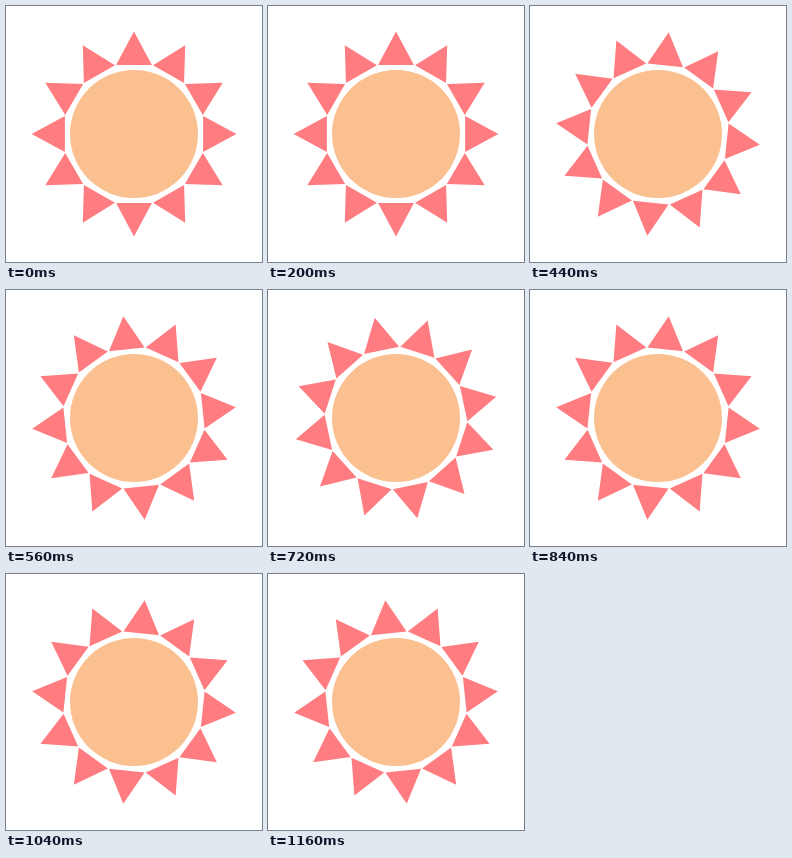
An HTML page for the animation above (1.2 s loop, 256 by 256 pixels).

```html
<!DOCTYPE html>
<html lang="en">
<head>
<meta charset="utf-8">
<title>Turning sun</title>
<style>
  html, body { margin: 0; width: 100%; height: 100%; overflow: hidden; background: #fff; }
  svg { display: block; width: 100%; height: 100%; }
</style>
</head>
<body>
<svg viewBox="-50 -50 100 100">
  <path id="rays" fill="#ff7c81"/>
  <circle r="25" fill="#fac090"/>
</svg>
<script>
  const LOOP = 1200, STEP = 40, TURN = 180;
  const RAYS = 12, TIP = 40, BASE = 27, HALF = 7;
  const rays = document.getElementById('rays');

  // A point at distance r outward and s sideways along a ray
  function point(angle, r, s) {
    const c = Math.cos(angle), n = Math.sin(angle);
    return `${(r * c - s * n).toFixed(3)},${(r * n + s * c).toFixed(3)}`;
  }

  function ray(_, i) {
    const a = i * 2 * Math.PI / RAYS;
    return `M${point(a, TIP, 0)}L${point(a, BASE, HALF)}L${point(a, BASE, -HALF)}Z`;
  }

  rays.setAttribute('d', Array.from({ length: RAYS }, ray).join(''));

  // The sun turns in steps, half a turn per loop
  function draw(ms) {
    const t = Math.floor((ms % LOOP) / STEP) * STEP;
    rays.setAttribute('transform', `rotate(${t / LOOP * TURN})`);
  }

  function tick() {
    draw(performance.now());
    requestAnimationFrame(tick);
  }

  draw(0);
  requestAnimationFrame(tick);
</script>
</body>
</html>
```
